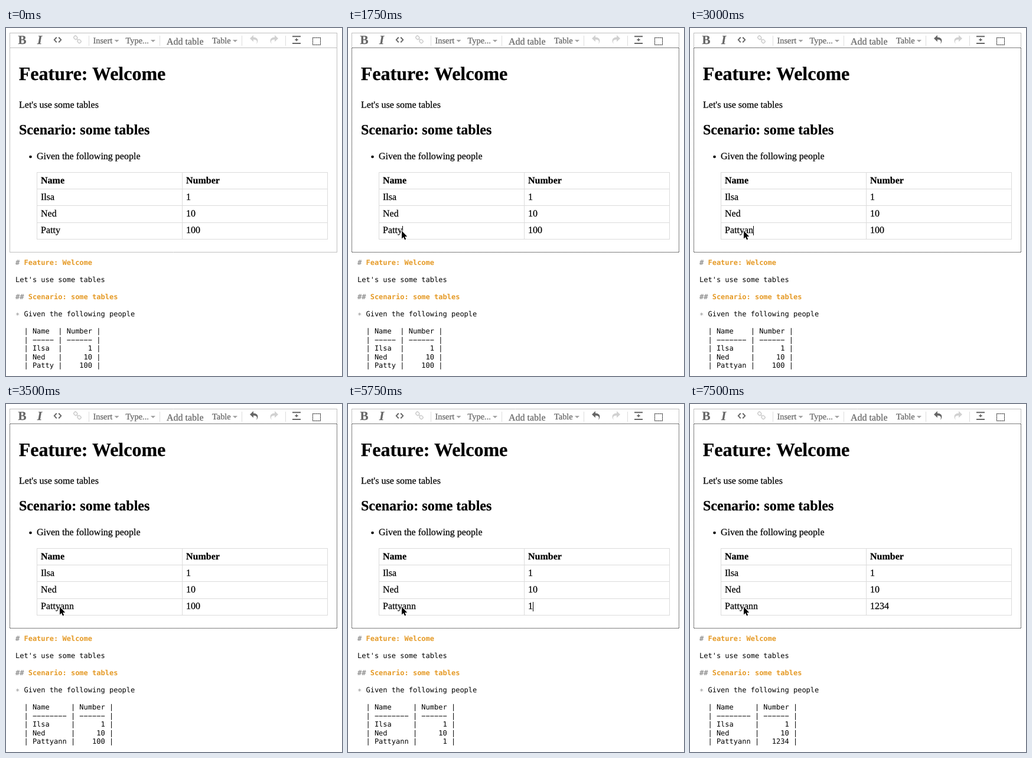
An HTML page with a canvas that plays this animation: 569x589 px, repeating every 8 s.

```html
<!DOCTYPE html>
<html lang="en">
<head>
<meta charset="utf-8">
<title>Table editor</title>
<style>
  html, body { margin: 0; width: 100%; height: 100%; overflow: hidden; background: #fff; }
  canvas, svg { position: absolute; left: 0; top: 0; width: 569px; height: 589px; }
  text { font: 16px "Liberation Serif", "Times New Roman", serif; text-rendering: geometricPrecision; white-space: pre; fill: #000; stroke: #000; stroke-width: .25px; }
  .h1 { font-size: 32px; font-weight: bold; }
  .h2 { font-size: 24px; font-weight: bold; }
  .th { font-weight: bold; }
  .tool, .menu, .bold, .em { fill: #666; stroke: #666; }
  .menu { font-size: 14.4px; }
  .bold, .em { font-size: 21px; font-weight: bold; }
  .em { font-style: italic; }
  .md, .mdh { font: 12px "DejaVu Sans Mono", monospace; stroke: none; }
  .mdh { font-weight: bold; fill: #e59a26; }
  .mark { fill: #929292; }
</style>
</head>
<body>
<canvas id="shapes" width="569" height="589"></canvas>
<svg id="layer" viewBox="0 0 569 589">
  <g id="words"></g>
  <rect id="caret" y="335" width="1" height="16"/>
  <path id="pointer" d="M0 0V13.2L3 10.5L5.1 15.2L7.2 14.3L5.2 9.6H9.2Z"
        stroke="#fff" stroke-width="2" stroke-linejoin="round" paint-order="stroke"/>
</svg>
<script>
const LOOP = 8000;
const GREY = '#666';
const $ = id => document.getElementById(id);
const ctx = $('shapes').getContext('2d');

// Each step overrides part of the state from its time on.
const steps = [
  [0, { name: 'Patty', num: '100', caret: 0, pointer: null, focus: false, undo: false, selected: false }],
  [750, { pointer: [299, 97] }],
  [1000, { pointer: [224, 159] }],
  [1250, { pointer: [83.3, 363] }],
  [1500, { pointer: [91, 343.3] }],
  [1750, { focus: true, caret: 92 }],
  [2250, { caret: 0 }],
  [2500, { name: 'Pattya', caret: 99, undo: true }],
  [2750, { caret: 0 }],
  [3000, { name: 'Pattyan', caret: 107 }],
  [3500, { name: 'Pattyann', caret: 0 }],
  [4000, { caret: 115 }],
  [4250, { caret: 0, selected: true }],
  [5750, { num: '1', caret: 313, selected: false }],
  [6250, { caret: 0 }],
  [6500, { num: '12', caret: 321 }],
  [6750, { caret: 0 }],
  [7000, { num: '123', caret: 329 }],
  [7250, { num: '1234', caret: 337 }],
  [7500, { caret: 0 }]
];

function svgText(x, y, cls, str = '') {
  const el = document.createElementNS('http://www.w3.org/2000/svg', 'text');
  el.setAttribute('x', x);
  el.setAttribute('y', y);
  el.setAttribute('class', cls);
  el.textContent = str;
  $('words').append(el);
  return el;
}

// Toolbar labels
svgText(20.4, 26.8, 'bold', 'B');
svgText(53, 26.8, 'em', 'I');
svgText(147.5, 26, 'menu', 'Insert');
svgText(202.5, 26, 'menu', 'Type...');
svgText(272, 28, 'tool', 'Add table');
svgText(349, 26, 'menu', 'Table');

// Document
svgText(21.8, 88, 'h1', 'Feature: Welcome');
svgText(22, 135, '', "Let's use some tables");
svgText(22, 180, 'h2', 'Scenario: some tables');
svgText(52, 222, '', 'Given the following people');
const people = [['Name', 'Number'], ['Ilsa', '1'], ['Ned', '10'], ['', '']];
const cells = people.map((row, r) =>
  row.map((str, c) => svgText(c ? 305 : 59, 263 + 28 * r, r ? '' : 'th', str)));

// Markdown
const mdY = line => 401.3 + 14.5 * line;
const MD_X = 16, MD_W = 7.2246;
function mdLine(line, mark, str, cls) {
  svgText(MD_X, mdY(line), cls + ' mark', mark);
  svgText(MD_X + MD_W * (mark.length + 1), mdY(line), cls, str);
}
mdLine(0, '#', 'Feature: Welcome', 'mdh');
svgText(MD_X, mdY(2), 'md', "Let's use some tables");
mdLine(4, '##', 'Scenario: some tables', 'mdh');
// Centred star and wide dashes suit the lower, wider glyphs of the editor's font.
mdLine(6, '\u2217', 'Given the following people', 'md');
const mdRows = [0, 1, 2, 3, 4].map(i => svgText(MD_X, mdY(8 + i), 'md'));
const dashes = n => '\u2212'.repeat(n);

function markdown(name, num) {
  const w = Math.max(5, name.length);
  const rows = [...people.slice(0, 3), [name, num]];
  const out = rows.map(([a, b]) => `  | ${a.padEnd(w)} | ${b.padStart(6)} |`);
  out.splice(1, 0, `  | ${dashes(w)} | ${dashes(6)} |`);
  return out;
}

const icons = {
  code: new Path2D('M608 192l-96 96 224 224-224 224 96 96 288-320-288-320zM288 192l-288 320 288 320 96-96-224-224 224-224-96-96z'),
  undo: new Path2D('M761 1024c113-206 132-520-313-509v253l-384-384 384-384v248c534-13 594 472 313 775z'),
  redo: new Path2D('M576 248v-248l384 384-384 384v-253c-446-10-427 303-313 509-280-303-221-789 313-775z'),
  join: new Path2D('M0 75h800v125h-800zM0 825h800v125h-800zM250 450h100v-100h100v100h100v100h-100v100h-100v-100h-100z')
};

function scoped(x, y, sx, sy, alpha, paint) {
  ctx.save();
  ctx.translate(x, y);
  ctx.scale(sx, sy);
  ctx.globalAlpha = alpha;
  ctx.fillStyle = ctx.strokeStyle = GREY;
  paint();
  ctx.restore();
}

const icon = (path, x, alpha = 1, sx = 1 / 64, sy = 1 / 64) =>
  scoped(x, 12, sx, sy, alpha, () => ctx.fill(path));

function linkIcon(alpha) {
  scoped(113.5, 12, 1 / 64, 1 / 64, alpha, () => {
    const loops = new Path2D();
    const turn = new DOMMatrix().translate(475, 475).rotate(45);
    for (const side of [-1, 1]) {
      const box = new Path2D();
      box.roundRect(side * 284 - 180, -158, 360, 316, 80);
      loops.addPath(box, turn);
    }
    loops.moveTo(410, 410);
    loops.lineTo(540, 540);
    ctx.lineWidth = 105;
    ctx.stroke(loops);
  });
}

function fill(color, x, y, w, h) {
  ctx.fillStyle = color;
  ctx.fillRect(x, y, w, h);
}

function frame(color, x, y, w, h, dash = [], offset = 0) {
  ctx.strokeStyle = color;
  ctx.lineWidth = 1;
  ctx.setLineDash(dash);
  ctx.lineDashOffset = offset;
  for (const [x1, y1, x2, y2] of [
    [x, y + .5, x + w, y + .5], [x, y + h - .5, x + w, y + h - .5],
    [x + .5, y, x + .5, y + h], [x + w - .5, y, x + w - .5, y + h]
  ]) {
    ctx.beginPath();
    ctx.moveTo(x1, y1);
    ctx.lineTo(x2, y2);
    ctx.stroke();
  }
  ctx.setLineDash([]);
}

function drawToolbar(s) {
  frame('#c0c0c0', 6, 8, 555, 26);
  for (const x of [140, 260, 399, 473]) fill('#ddd', x, 13, 1, 17);
  for (const x of [183.5, 245, 384]) {
    scoped(x, 20, 1, 1, .6, () => ctx.fill(new Path2D('M0 0h8l-4 4z')));
  }
  icon(icons.code, 80.5);
  linkIcon(s.selected ? 1 : .3);
  icon(icons.undo, 412, s.undo ? 1 : .3, 1 / 64, 1 / 68);
  icon(icons.redo, 446, .3, 1 / 64, 1 / 68);
  icon(icons.join, 485, 1, 14 / 800, 15 / 950);
  frame('#8a8a8a', 519, 16, 14, 13);
  frame('#444', 519, 16, 14, 13, [2, 1]);
}

function drawEditor(s) {
  fill('#fff', 6, 33, 555, 347);
  if (s.focus) frame('#000', 6, 33, 555, 347, [1, 1], 1);
  else frame('#c0c0c0', 6, 33, 555, 347);
  ctx.fillStyle = '#000';
  ctx.beginPath();
  ctx.arc(41.5, 218, 2.3, 0, 7);
  ctx.fill();
  for (const y of [244, 272, 300, 329, 357]) fill('#dcdcdc', 52, y, 493, 1);
  for (const x of [52, 298, 544]) fill('#dcdcdc', x, 244, 1, 113);
  if (s.selected) fill('#b3d7ff', 305, 335, 24, 16);
}

function stateAt(t) {
  return Object.assign({}, ...steps.filter(([start]) => start <= t).map(([, part]) => part));
}

function draw(s) {
  ctx.clearRect(0, 0, 569, 589);
  drawToolbar(s);
  drawEditor(s);
  cells[3][0].textContent = s.name;
  cells[3][1].textContent = s.num;
  markdown(s.name, s.num).forEach((str, i) => { mdRows[i].textContent = str; });
  $('caret').setAttribute('x', s.caret);
  $('caret').style.display = s.caret ? '' : 'none';
  $('pointer').style.display = s.pointer ? '' : 'none';
  if (s.pointer) $('pointer').setAttribute('transform', `translate(${s.pointer})`);
}

const begin = performance.now();
function tick() {
  draw(stateAt((performance.now() - begin) % LOOP));
  requestAnimationFrame(tick);
}
tick();
</script>
</body>
</html>
```
